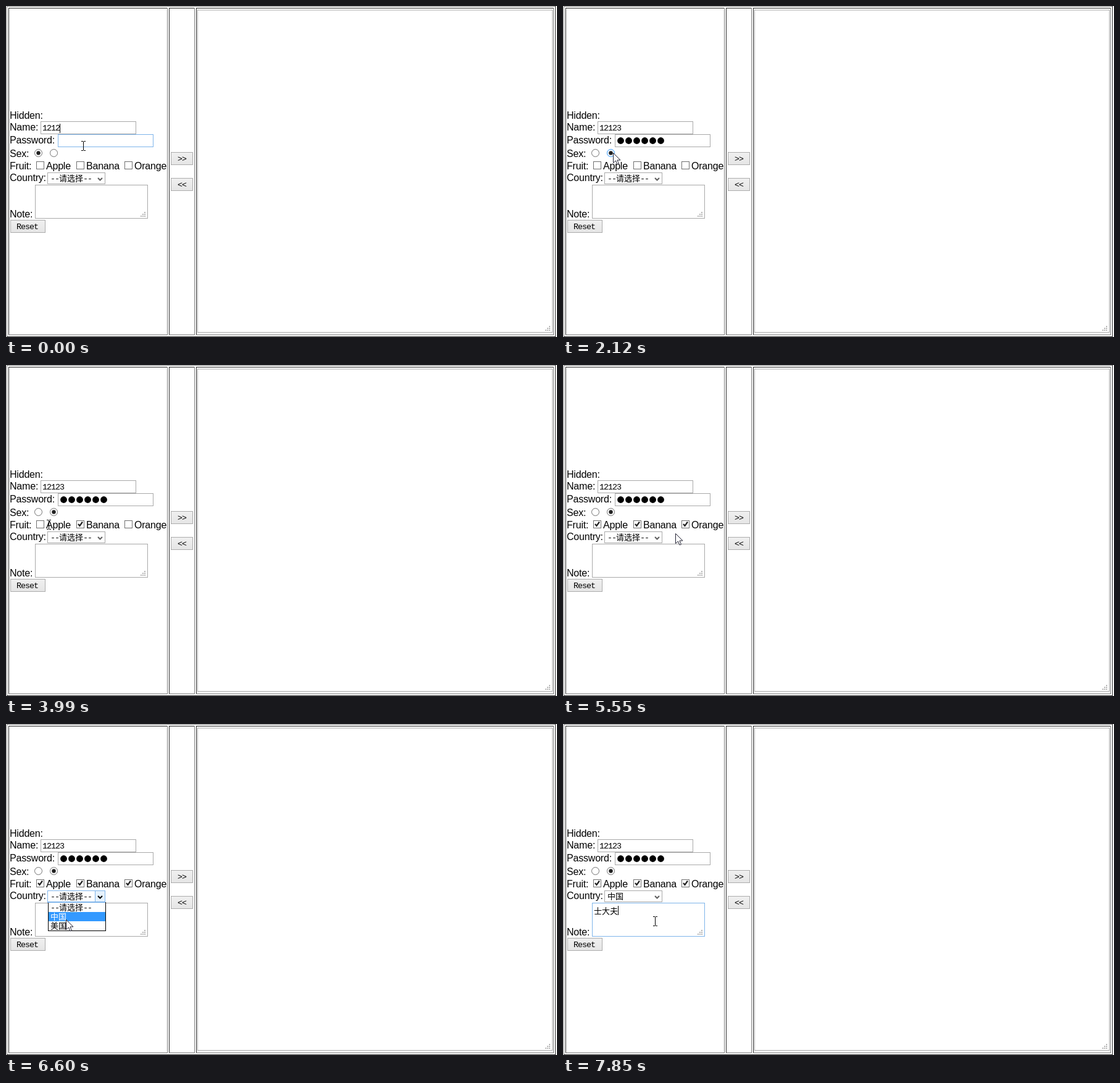
An HTML page with a canvas that plays this animation: 893x537 px, repeating every 8 s.

```html
<!DOCTYPE html>
<html>
<head>
<meta charset="utf-8">
<style>
html, body { margin: 0; width: 893px; height: 537px; overflow: hidden; background: #fff; }
canvas { display: block; }
</style>
</head>
<body>
<canvas width="893" height="537"></canvas>
<script>
const c = document.querySelector('canvas').getContext('2d');
const LOOP = 8000, STEP = LOOP / 56, LAG = 26;
const BLUE = '#7eb4ea', HOT = '#3399ff', GRAY = '#a9a9a9';
const SMALL = [13.33, 13], LARGE = [15, 16];

const fields = { name: [56, 187, 155, 21], password: [84, 208, 155, 21], note: [47, 290, 183, 55] };
const fruits = [['Apple', 49], ['Banana', 114], ['Orange', 192]];
const select = [67, 270, 94, 19];
const candidates = {
  s: '是 上 时 说 三 市 四 生 少',
  sd: '时代 速度 手动 属地 湿地 圣诞 三大 收到 深度',
  sdf: '士大夫 是的发 收到否 说得分 三点法 四大法 深度分 设定方法 手动方式',
};

// step, x, y of the pointer's turning points
const route = [
  [0, 125, 227], [9, 126, 227], [12, 82, 243], [15, 81, 238], [18, 118, 262],
  [21, 122, 256], [23, 143, 258], [28, 69, 259], [30, 57, 259], [32, 95, 268],
  [34, 230, 262], [36, 202, 255], [38, 202, 255], [39, 182, 273], [40, 168, 293],
  [42, 152, 281], [46, 97, 317], [48, 98, 328], [50, 98, 328], [55, 149, 320],
];

const clamp = (v, lo, hi) => Math.max(lo, Math.min(hi, v));

function pointerAt(k) {
  const i = Math.max(1, route.findIndex(p => p[0] >= k));
  const [k0, x0, y0] = route[i - 1], [k1, x1, y1] = route[i];
  const f = (k - k0) / (k1 - k0);
  return [Math.round(x0 + (x1 - x0) * f), Math.round(y0 + (y1 - y0) * f)];
}

function formAt(k) {
  return {
    name: k < 1 ? '1212' : '12123',
    dots: clamp(Math.round((k - 5) * 1.2), 0, 6),
    caret: k < 3 ? 'name' : k < 11 ? 'password' : k < 49 ? '' : 'note',
    sex: k < 13 ? 0 : 1,
    fruit: [k >= 30, k >= 21, k >= 37],
    open: k >= 42 && k < 47,
    country: k < 47 ? '--请选择--' : '中国',
    typed: k < 54 ? 'sdf'.slice(0, Math.max(0, k - 49)) : '',
    note: k < 54 ? '' : '士大夫',
  };
}

function rect(x, y, w, h, color) {
  c.fillStyle = color;
  c.fillRect(x, y, w, h);
}

function box(x, y, w, h, border, fill = '#fff', far = border) {
  rect(x, y, w, h, far);
  rect(x, y, w - 1, h - 1, border);
  rect(x + 1, y + 1, w - 2, h - 2, fill);
}

function path(points, color, width, fill) {
  c.beginPath();
  points.forEach(([x, y]) => c.lineTo(x, y));
  if (fill) { c.closePath(); c.fillStyle = fill; c.fill(); }
  if (width) { c.strokeStyle = color; c.lineWidth = width; c.stroke(); }
}

function disc(x, y, r, fill, border) {
  c.beginPath();
  c.arc(x, y, r, 0, 7);
  c.fillStyle = fill;
  c.fill();
  if (border) { c.strokeStyle = border; c.lineWidth = 1; c.stroke(); }
}

function label(s, x, y, weight = '') {
  c.font = weight + ' 16px "Liberation Sans", Arial, sans-serif';
  c.letterSpacing = '-0.2px';
  c.fillStyle = '#000';
  c.fillText(s, x, y);
}

// Latin and Chinese runs use different fonts; returns the end of the line
function mono(s, x, y, color = '#000', [latin, han] = SMALL) {
  c.fillStyle = color;
  for (const run of s.match(/[ -~]+|[^ -~]+/g) || []) {
    const isLatin = run < '~';
    c.font = isLatin ? latin + 'px "Liberation Mono", monospace'
                     : han + 'px "Noto Sans CJK SC", "Noto Sans CJK", sans-serif';
    c.letterSpacing = isLatin ? '-1px' : '0px';
    c.fillText(run, x, y);
    x += c.measureText(run).width;
  }
  return x;
}

function grip(x, y) {
  for (let i = 0; i < 3; i++)
    for (let j = 2 - i; j < 3; j++) rect(x + j * 3, y + i * 3, 2, 2, '#b4b4b4');
}

function button(s, x, y, w, tx) {
  const g = c.createLinearGradient(0, y, 0, y + 21);
  g.addColorStop(0, '#f0f0f0');
  g.addColorStop(1, '#e5e5e5');
  box(x, y, w, 21, '#acacac', g);
  mono(s, tx, y + 15);
}

function caret(x, y) { rect(Math.round(x), y, 1, 15, '#000'); }

function page() {
  rect(0, 0, 893, 537, '#fff');
  box(1, 0, 890, 537, '#808080', '#fff', '#2c2c2c');
  for (const [x, w] of [[4, 258], [264, 42], [308, 580]])
    box(x, 3, w, 531, '#2c2c2c', '#fff', '#808080');
  box(310, 6, 576, 524, GRAY);
  grip(874, 519);
  button('>>', 267, 237, 36, 278);
  button('<<', 267, 279, 36, 278);
  button('Reset', 7, 347, 57, 17);
  [['Hidden:', 183], ['Name:', 202], ['Password:', 223], ['Sex:', 245],
   ['Fruit:', 265], ['Country:', 284], ['Note:', 343]].forEach(([s, y]) => label(s, 6, y));
}

function form(s, over, y) {
  for (const area of Object.values(fields)) box(...area, over(...area) ? BLUE : GRAY);
  grip(218, 334);
  for (let i = 0; i < s.dots; i++) disc(93.5 + i * 13, 218.5, 5.4, '#000');
  const nameEnd = mono(s.name, 59, 202), noteEnd = mono(s.note, 50, 308);
  if (s.caret == 'name') caret(nameEnd, 191);
  if (s.caret == 'password') caret(87 + s.dots * 13, 212);
  if (s.caret == 'note') caret(noteEnd, 295);

  [52.5, 77.5].forEach((x, i) => {
    const hot = over(x - 7, 232, 14, 13);
    disc(x, 238.5, 6, hot ? '#f3f9ff' : '#fff', hot ? HOT : '#707070');
    if (s.sex == i) disc(x, 238.5, 3.2, '#212121');
  });

  fruits.forEach(([name, x], i) => {
    const hot = over(x, 252, 13, 13);
    box(x, 252, 13, 13, hot ? HOT : '#707070', hot ? '#f3f9ff' : '#fff');
    if (s.fruit[i]) path([[x + 3, 258], [x + 5.5, 261], [x + 10, 254.5]], '#212121', 2.2);
    label(name, x + 16, 265);
  });

  const hot = s.open || over(...select);
  box(...select, hot ? BLUE : GRAY);
  if (hot) box(144, 270, 17, 19, BLUE, '#e5f1fc');
  path([[149, 279], [152.5, 282.5], [156, 279]], hot ? '#000' : '#606060', 2);
  mono(s.country, 72, 284);
  if (s.open) menu(clamp(Math.floor((y - 290) / 15), 0, 2));
}

function menu(row) {
  box(68, 289, 94, 47, '#000');
  rect(67, 289, 94, 1, BLUE);
  rect(69, 290 + row * 15, 92, 15, HOT);
  ['--请选择--', '中国', '美国'].forEach((s, i) =>
    mono(s, 72, 302 + i * 15, i == row ? '#fff' : '#000'));
}

function inputMethod(typed) {
  const words = candidates[typed].split(' ');
  const w = words.reduce((sum, word) => sum + 30 + 16 * word.length, 75), right = 64 + w;
  c.save();
  c.shadowColor = 'rgba(0,0,0,.7)';
  c.shadowBlur = 2;
  c.shadowOffsetX = c.shadowOffsetY = 2;
  rect(64, 238, w, 51, '#ccc');
  c.restore();
  box(64, 238, w, 51, '#d4d4d4', '#f4f4f4');
  label(typed, 71, 256, 'bold');
  rect(Math.round(71 + c.measureText(typed).width), 242, 1, 19, '#4aa8e8');
  let x = 69;
  words.forEach((word, i) => {
    if (!i) {
      c.beginPath();
      c.roundRect(66, 262, 27 + 16 * word.length, 24, 4);
      c.fillStyle = '#3a75cf';
      c.fill();
    }
    x = mono(i + 1 + '.' + word, x, 279, i ? '#000' : '#fff', LARGE) + 14;
  });
  disc(right - 28, 250, 7, '#3b6fd4');
  [[36, -1, '#a0a0a0'], [14, 1, '#3275d8']].forEach(([dx, dir, color]) => {
    const mid = right - dx;
    box(mid - 11, 262, 22, 18, '#dcdcdc', '#f8f8f8');
    path([[-8, -4], [0, -1.5], [8, -4], [0, 4]].map(([a, b]) => [mid + a, 271 + b * dir]), '', 0, color);
  });
}

function beam(x, y) {
  rect(x, y - 7, 1, 14, '#000');
  for (const dy of [-8, 7])
    for (const dx of [-3, 1]) rect(x + dx, y + dy, 3, 1, '#000');
}

function arrow(x, y) {
  const shape = [[0, 0], [0, 16], [4, 12.5], [6.5, 18.5], [9, 17.5], [6.5, 11.5], [11.5, 11.5]];
  path(shape.map(([a, b]) => [x + a + .5, y + b + .5]), '#223', 1, '#fff');
}

function draw(now) {
  const k = Math.min(55, Math.floor((now % LOOP + LAG) / STEP));
  const state = formAt(k), [x, y] = pointerAt(k);
  const over = (l, t, w, h) => !state.open && x >= l && x < l + w && y >= t && y < t + h;
  const overText = Object.values(fields).some(area => over(...area)) ||
    fruits.some(([name, l]) => over(l + 16, 251, name.length * 9, 18));
  page();
  form(state, over, y);
  if (state.typed) inputMethod(state.typed);
  (overText ? beam : arrow)(x, y);
  requestAnimationFrame(() => draw(performance.now()));
}
draw(0);
</script>
</body>
</html>
```
